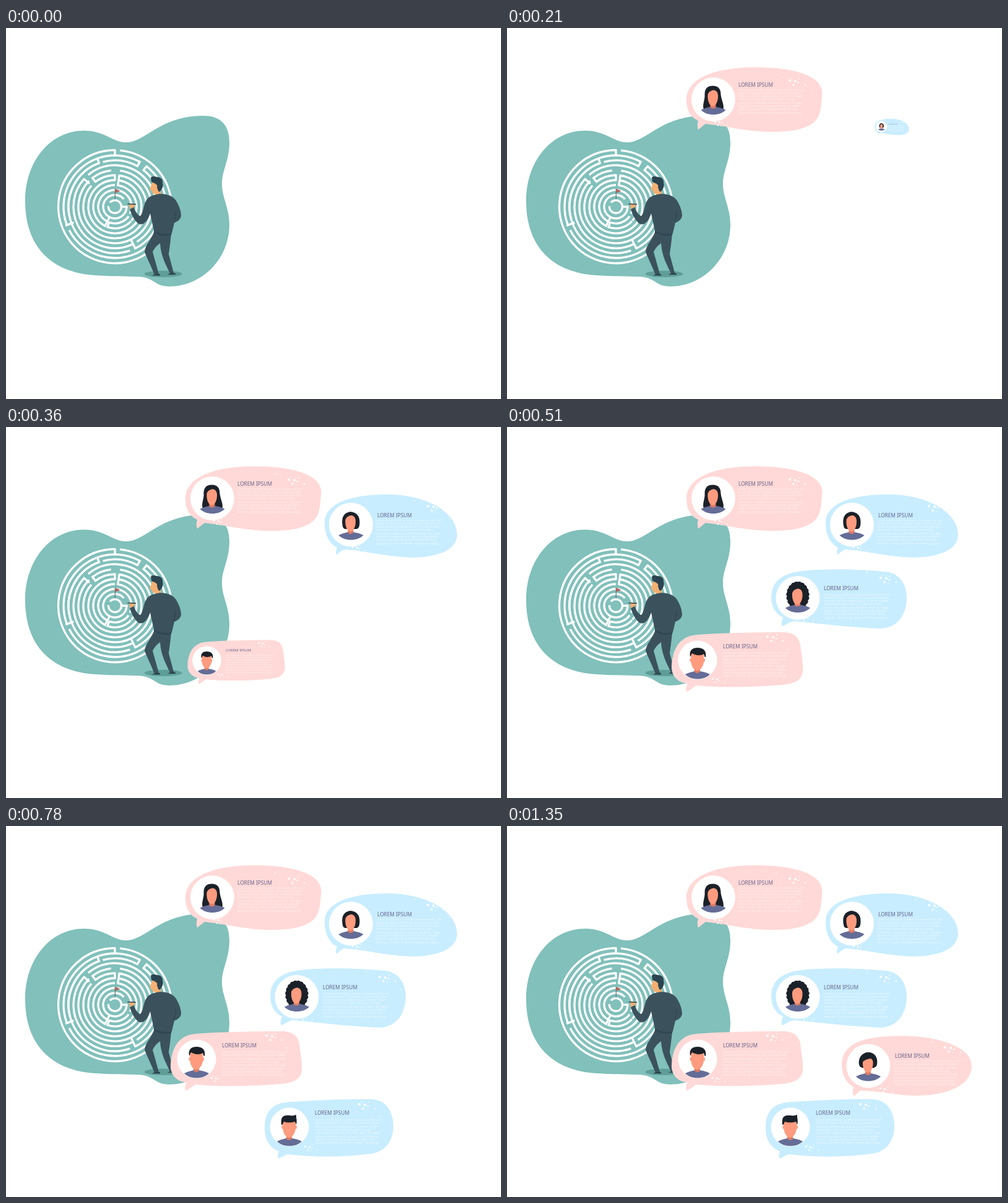
An HTML page with a canvas that plays this animation: 800 px wide and 600 px high, repeating every 1470 ms.

```html
<!DOCTYPE html>
<html lang="en">
<head>
<meta charset="utf-8">
<title>Maze and speech bubbles</title>
<style>
html, body { margin: 0; width: 100%; height: 100%; overflow: hidden; background: #fff; }
canvas { display: block; }
</style>
</head>
<body>
<canvas id="stage" width="800" height="600"></canvas>
<script>
const ctx = document.getElementById('stage').getContext('2d');
const LOOP = 1470, STEP = 30, POP = 90;
const PINK = '#ffd9d7', BLUE = '#c8edff', TEAL = '#81c0bb';
const DARK = '#3b525d', INK = '#2c4450', HAIR = '#1b2128';
const SKIN = '#ff9b7e', NECK = '#dd7b64', SHIRT = '#646d97';

const rad = deg => deg * Math.PI / 180;

function shape(d, color) {
  ctx.fillStyle = color;
  ctx.fill(new Path2D(d));
}

function line(d, color, width) {
  ctx.strokeStyle = color;
  ctx.lineWidth = width;
  ctx.stroke(new Path2D(d));
}

function oval(x, y, rx, ry, color) {
  ctx.fillStyle = color;
  ctx.beginPath();
  ctx.ellipse(x, y, rx, ry, 0, 0, Math.PI * 2);
  ctx.fill();
}

// Largest font size up to max at which the text is no wider than width.
function fitFont(style, family, text, width, max) {
  ctx.font = `${style} ${max}px ${family}`;
  const size = Math.min(max, max * width / ctx.measureText(text).width);
  return `${style} ${size}px ${family}`;
}

// Ring arcs: radius, start angle, end angle. Walls: angle, inner and outer radius.
const rings = [
  [91.5, -85, 270], [83, -109, -61], [83, -52, 153], [83, 160, 250],
  [75, -105, -61], [75, -52, 64], [75, 71, 250], [75, -196, -110],
  [67, -130, 58], [67, 64, 222], [59, -128, -96], [59, -82, 225],
  [51, -128, -90], [51, -82, 222], [43, -82, 262], [43, -120, -90],
  [35, -82, 40], [35, 42, 112], [35, 117, 270],
  [27, 35, 108], [27, 117, 385], [19, 0, 320], [10.5, -140, 185]
];
const walls = [
  [-90, 83, 91.5], [-110, 75, 83], [-61, 75, 83], [-52, 75, 83],
  [-138, 57, 67], [-128, 51, 59], [-90, 43, 51], [-82, 35, 51],
  [159, 73, 84], [117, 21, 35], [110, 27, 35], [64, 62, 75], [0, 10.5, 19]
];

function drawMaze() {
  ctx.save();
  ctx.translate(176, 289);
  ctx.strokeStyle = '#fff';
  ctx.lineWidth = 3.3;
  for (const [r, from, to] of rings) {
    ctx.beginPath();
    ctx.arc(0, 0, r, rad(from), rad(to));
    ctx.stroke();
  }
  for (const [angle, inner, outer] of walls) {
    const c = Math.cos(rad(angle)), s = Math.sin(rad(angle));
    ctx.beginPath();
    ctx.moveTo(c * (inner - 1.5), s * (inner - 1.5));
    ctx.lineTo(c * (outer + 1.5), s * (outer + 1.5));
    ctx.stroke();
  }
  ctx.restore();
  line('M176.3 260V277', '#5d7375', 1.2);
  shape('M176.5 260L184.5 263.5L176.5 267Z', '#b5625c');
}

function drawMan() {
  oval(254, 397.7, 30.5, 5.2, '#5f9d97');
  shape('M240 327L267 332C266 345 264 358 263 366L271 396L265 397C258 382 250 368 249 348C243 353 239 357 237 362L247 398L240 399C234 384 227 370 224 362C225 350 236 342 240 327Z', DARK);
  shape('M236 400.5Q239 398 244 397.5L249 398V400.5Z M261 399Q264 396.5 269 395.5L274 397V399Z', INK);
  shape('M239 326C248 332 258 332 268 330L267 335C256 337 245 335 239 330Z', '#2f4653');
  shape('M236 250C234.5 255 233 259 232.8 262L236 264C236 268 239 269 241 268L240 272L251 271L249 258L243 249Z', '#f3b073');
  shape('M234 242C236 239 240 240 244 241C250 241 254 245 253 250C255 256 252 262 248 265C244 263 246 259 243 257L242 252L235 249Z', INK);
  oval(242.5, 256, 1.8, 3, '#f3b073');
  shape('M240 270C252 266 267 269 274 278C280 287 283 297 283 304C282 310 277 313 272 315L268 332C258 334 248 333 239 328L233 300C228 314 222 319 215 317C208 313 203 302 200 293L206 289C209 297 213 303 217 304C222 300 222 284 228 277C231 273 235 271 240 270Z', DARK);
  line('M273.5 296C275.5 302 272 307 271.5 313', '#2b414c', 1);
  shape('M200 293L199.5 287C197 285 200 283.5 203 284L208 285C210 287 207 289 206 290Z', '#f3b073');
  line('M196.5 284.5L210 285.3', INK, 1.5);
}

function drawScene() {
  ctx.fillStyle = '#fff';
  ctx.fillRect(0, 0, 800, 600);
  shape('M31 280C31 215 72 166 126 166C160 166 172 185 194 185C226 185 248 142 319 142C350 142 361 160 361 185C361 215 349 230 349 252C349 275 361 290 361 318C361 375 315 418 264 418C240 418 240 404 216 402.3C190 401 170 402 145 400C75 396 31 355 31 280Z', TEAL);
  drawMaze();
  drawMan();
}

const hairs = {
  long: 'M-15 17C-19 10 -13 0 -14 -8C-14 -18 -9 -22 -1 -22C8 -22 12 -17 12 -8C13 2 18 8 16 17C10 21 -12 21 -15 17Z',
  bob: 'M-13 4C-16 -8 -14 -19 -1 -21C11 -20 14 -12 14 -4C14 2 13 6 9 7L-8 7C-11 7 -12 6 -13 4Z',
  round: 'M-15 -2C-17 -14 -9 -22 0 -22C10 -22 16 -14 14 -2C13 2 8 4 5 3L-8 3C-12 3 -14 1 -15 -2Z',
  side: 'M-12 -6C-14 -16 -8 -20 0 -20C9 -20 15 -15 13 -5C11 -4 11 -8 10 -10C4 -6 -4 -8 -9 -11C-11 -9 -10 -5 -12 -6Z',
  quiff: 'M-13 -4C-14 -15 -12 -20 -1 -19C5 -18 9 -19 11 -20L11 -16C12 -12 12 -7 11 -4L9 -9C3 -7 -4 -7 -9 -9L-11 -4Z'
};

function drawCurls() {
  oval(0, -5, 15, 20, HAIR);
  for (let i = 0; i < 16; i++) {
    const a = rad(130 + i * 280 / 15);
    oval(Math.cos(a) * 14.5, -4 + Math.sin(a) * 18.5, 4.3, 4.3, HAIR);
  }
}

function drawPerson(x, y, r, style) {
  const man = style === 'side' || style === 'quiff';
  const drop = man ? 6 : style === 'curly' ? -1 : 0;
  ctx.save();
  oval(x, y, r, r, '#fff');
  ctx.clip();
  ctx.translate(x, y);
  if (style === 'curly') drawCurls();
  else if (!man) shape(hairs[style], HAIR);
  ctx.translate(0, drop);
  shape('M-20 17C-12 13 -8 13 -5 12L4 12C8 13 13 13 20 17C11 27 -11 27 -20 17Z', SHIRT);
  shape('M-5 5H4V13Q-.5 17 -5 13Z', NECK);
  ctx.translate(0, -drop);
  if (man) {
    shape('M-10.5 -11H10V3C9 11 4 17 -.5 17C-5 17 -10 11 -10.5 3Z', SKIN);
    oval(-11, 0, 1.5, 3, SKIN);
    oval(10.5, 0, 1.5, 3, SKIN);
    shape(hairs[style], HAIR);
  } else {
    shape('M-9 -8C-7 -13 -3 -15 1 -15C6 -14 8 -10 7.5 -3C7 5 3 11 -1 11C-5 11 -10 4 -9 -8Z', SKIN);
    if (style === 'round') shape('M-10 -5V-15H9V-5C7 -9 6 -11 4 -12C0 -11 -6 -11 -10 -5Z', HAIR);
  }
  ctx.restore();
}

const copy = [
  'Lorem ipsum dolor sit amet consectetur elit, sed',
  'eiusmod tempor incididunt, quis nostrud ullam',
  'labore et dolore magna aliqua. Ut enim veniam',
  'exercitation. Duis aute irure dolor in culpa',
  'commodo consequat velit esse cillum. Eu fugiat',
  'pariatur excepteur sint occaecat non proident',
  'sunt in culpa qui officia deserunt mollit anim',
  'laborum. Ut enim ad minim veniam nisi aliquip'
];
const TITLE = 'LOREM IPSUM';
const titleFont = fitFont('extra-condensed 500', '"Noto Sans", "Open Sans", sans-serif', TITLE, 56, 15);
const copyFont = fitFont('300', '"Open Sans", sans-serif', copy[0], 106, 5.2);

// Sparkles: offset x, offset y, radius.
const sparkles = [
  [-6, -2, 2], [3, -1, 2], [0, 5, 1.7], [8, 1, 1.3], [19, 5, 1.2],
  [-28, -11, 1], [28, 18, .8], [9, -5, 1], [-3, -6, .8], [6, 7, .8]
];

function drawSparkles([x, y], size) {
  for (const [dx, dy, r] of sparkles) oval(x + dx * size, y + dy * size, r * size, r * size, '#fff');
}

const bubbles = [
  { start: 60, color: PINK, pivot: [400, 115.5], face: [333.5, 115.5, 35.5, 'long'],
    title: [374, 95], text: [374, 101.5], high: [463, 87], low: [341, 153],
    d: 'M290 116C290 84 330 63 405 63.5C455 64 509 74 509.5 105C508 122 508 138 500 148C488 163 462 168 428 168C390 168 350 158 321 155C317 158 312 162 309 164.5C307 158 308 154 309 150C296 144 290 132 290 116Z' },
  { start: 180, color: BLUE, pivot: [622, 160], face: [557.5, 158, 35.5, 'bob'],
    title: [600, 146], text: [598, 152.5], high: [688, 130], low: [565, 196],
    d: 'M515 155C514 125 555 109 615 109C680 109 729 138 729 174C729 198 700 211 655 211C615 210 580 200 546 198C541 201 537 204 534 207C532 203 534 198 535 195C521 188 515 172 515 155Z' },
  { start: 300, color: PINK, pivot: [372, 380], face: [308, 377, 31.5, 'side'],
    title: [349, 357.5], text: [349, 367], high: [427, 341], low: [337, 409],
    d: 'M266 388C267 362 277 338 307 336C345 333 400 332 445 332C467 332 474 342 475 360C477 375 479 385 478 396C475 412 462 415 445 417C400 421 350 422 306 418C300 422 295 426 291 428C288 423 290 419 292 415C275 413 266 402 266 388Z' },
  { start: 420, color: BLUE, pivot: [536.5, 278], face: [470, 276.5, 35.5, 'curly'],
    title: [512, 263.5], text: [513, 272.5], high: [610, 246], low: [480, 309],
    d: 'M427 274C429 243 452 233 500 231C540 229 580 231 612 234C634 236 646 254 646 276C646 302 632 326 602 326C555 324 505 318 463 314C456 316 450 320 445 322.5C442 317 445 312 446 308C433 302 427 290 427 274Z' },
  { start: 660, color: BLUE, pivot: [522, 490], face: [458, 487, 31.5, 'quiff'],
    title: [499, 467], text: [500, 477], high: [577, 452], low: [488, 520],
    d: 'M418 488C418 460 432 447 462 446C505 444 545 441 590 442C614 442 626 462 626 486C626 510 612 527 590 530C545 536 500 536 456 531C450 532 445 536 441 538C438 533 440 529 441 526C425 520 418 506 418 488Z' },
  { start: 960, color: PINK, pivot: [646, 388], face: [584, 388, 35.5, 'round'],
    title: [627, 375], text: [625, 382], high: [714, 360], low: [608, 426],
    d: 'M541 385C542 352 575 339 640 339.5C700 340 751 358 751 388C751 418 715 436 660 436C630 436 600 428 571 428C567 431 563 435 561 437C557 432 559 427 560 422C547 415 541 402 541 385Z' }
];

function drawBubble(b, time) {
  const p = Math.min(1, Math.max(0, (time - b.start) / POP));
  const scale = p * p * (3 - 2 * p);
  if (!scale) return;
  const [px, py] = b.pivot;
  ctx.save();
  ctx.translate(px, py);
  ctx.scale(scale, scale);
  ctx.translate(-px, -py);
  shape(b.d, b.color);
  drawSparkles(b.high, 1);
  drawSparkles(b.low, .8);
  drawPerson(...b.face);
  ctx.font = titleFont;
  ctx.fillStyle = '#66638b';
  ctx.fillText(TITLE, ...b.title);
  ctx.font = copyFont;
  ctx.fillStyle = '#fff';
  copy.forEach((row, i) => ctx.fillText(row, b.text[0], b.text[1] + i * 5.3));
  ctx.restore();
}

const began = performance.now();

function frame() {
  const time = Math.floor((performance.now() - began) % LOOP / STEP) * STEP;
  drawScene();
  for (const b of bubbles) drawBubble(b, time);
  requestAnimationFrame(frame);
}
frame();
</script>
</body>
</html>
```
